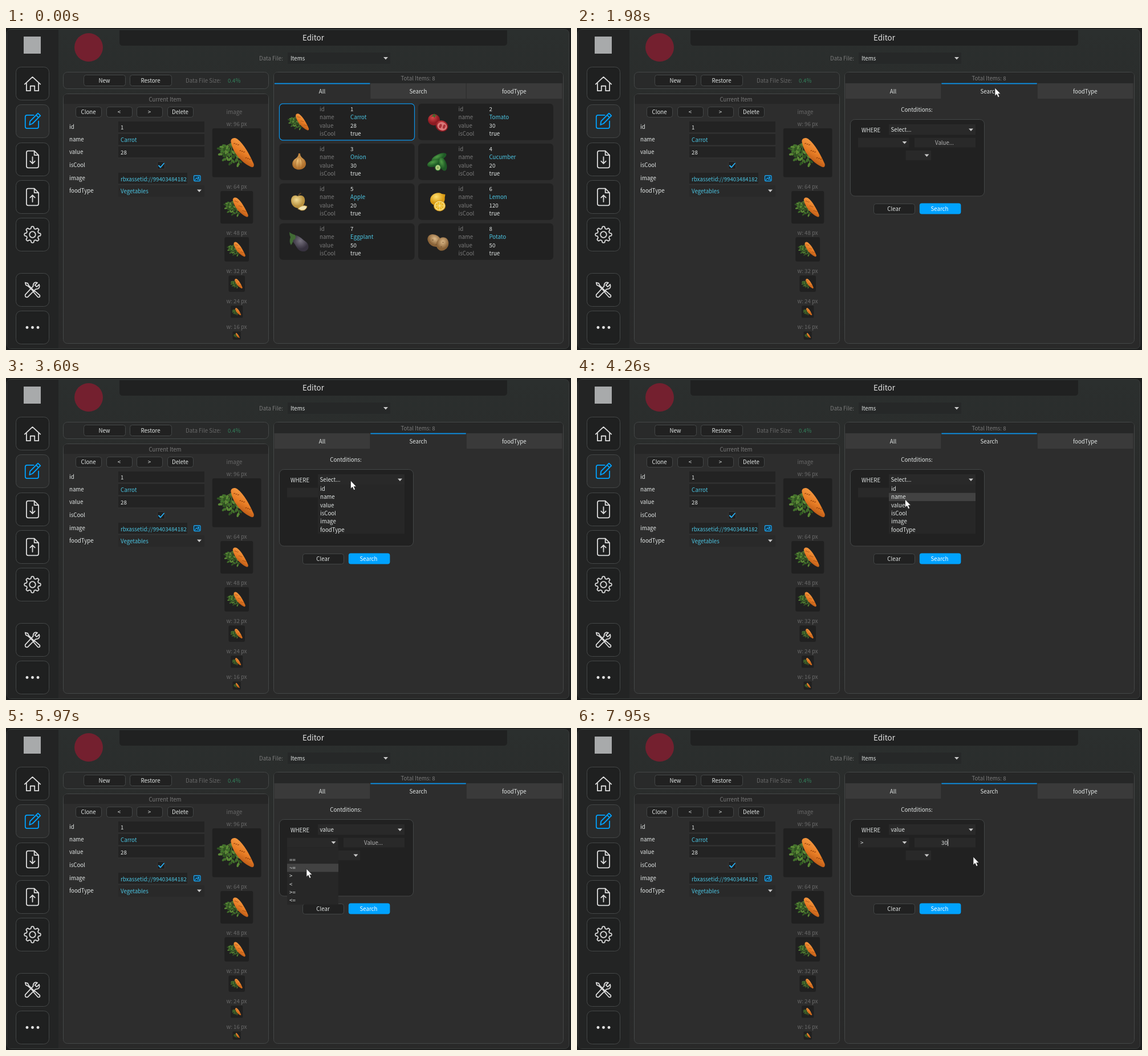
These frames come from a looping animation (991x565 px, 7990 ms). An HTML page:

```html
<!DOCTYPE html>
<html lang="en">
<head>
<meta charset="utf-8">
<title>Item editor</title>
<style>
html, body { margin: 0; width: 100%; height: 100%; overflow: hidden; background: #1e2020; }
svg { display: block; width: 991px; height: 565px; }
text { font-family: "Noto Sans CJK JP", "Noto Sans CJK SC", "Noto Sans", sans-serif; white-space: pre; }
</style>
</head>
<body>
<svg id="stage" viewBox="0 0 991 565">
  <defs>
    <linearGradient id="bg" x2="0" y2="1"><stop stop-color="#2b2f2e"/><stop offset=".25" stop-color="#2a2c2b"/><stop offset="1" stop-color="#292929"/></linearGradient>
    <linearGradient id="orange" x1="0.7" y1="0.1" x2="0.3" y2="0.9"><stop stop-color="#f7a04a"/><stop offset=".5" stop-color="#e87d25"/><stop offset="1" stop-color="#a84c12"/></linearGradient>
    <radialGradient id="red" cx=".4" cy=".3"><stop stop-color="#d8484a"/><stop offset="1" stop-color="#8c1a22"/></radialGradient>
    <radialGradient id="gold" cx=".45" cy=".45"><stop stop-color="#f0c378"/><stop offset="1" stop-color="#b0702c"/></radialGradient>
    <radialGradient id="green" cx=".4" cy=".3"><stop stop-color="#4f9c45"/><stop offset="1" stop-color="#1f5a26"/></radialGradient>
    <radialGradient id="cream" cx=".4" cy=".35"><stop stop-color="#f2dc95"/><stop offset="1" stop-color="#b8913f"/></radialGradient>
    <radialGradient id="yellow" cx=".4" cy=".3"><stop stop-color="#ffe070"/><stop offset="1" stop-color="#d99a14"/></radialGradient>
    <radialGradient id="plum" cx=".5" cy=".35"><stop stop-color="#77727f"/><stop offset="1" stop-color="#37323f"/></radialGradient>
    <radialGradient id="tan" cx=".45" cy=".35"><stop stop-color="#dcb988"/><stop offset="1" stop-color="#8a6338"/></radialGradient>
  </defs>
  <g id="base"></g><g id="scene"></g>
  <path id="cursor" d="M0 0V14.2L3.2 11.3L5.5 16.6L8 15.5L5.7 10.4H10Z" fill="#fff" stroke="#222" stroke-width=".7"/>
</svg>
<script>
const LOOP = 7990;
const WHITE = '#e4e8e7', CYAN = '#4cc6e4', GREY = '#7b7b7b', DIM = '#696969', BLUE = '#00a2ff';
const EDGE = '#444747', PANEL = '#2d2d2d', DARK = '#212121', FIELD = '#292929';
const $ = id => document.getElementById(id);

const rect = (x, y, w, h, fill, r = 0, stroke = 'none', sw = 1) =>
  `<rect x="${x}" y="${y}" width="${w}" height="${h}" rx="${r}" fill="${fill}" stroke="${stroke}" stroke-width="${sw}"/>`;
const path = (d, fill, stroke = 'none', sw = 1) =>
  `<path d="${d}" fill="${fill}" stroke="${stroke}" stroke-width="${sw}" stroke-linecap="round" stroke-linejoin="round"/>`;
const oval = (x, y, rx, ry, fill, turn = 0) =>
  `<ellipse rx="${rx}" ry="${ry}" fill="${fill}" transform="translate(${x} ${y}) rotate(${turn})"/>`;
const place = (x, y, s, body) => `<g transform="translate(${x} ${y}) scale(${s})">${body}</g>`;
// y is the middle of the capitals; baselines sit on whole pixels
const text = (x, y, s, fill = WHITE, anchor = 'start', size = 9.7) =>
  `<text x="${x}" y="${Math.round(y + size * .37)}" fill="${fill}" text-anchor="${anchor}" font-size="${size}">${s.replace(/</g, '&lt;')}</text>`;
const mid = (x, y, s, fill, size) => text(x, y, s, fill, 'middle', size);
const arrow = (x, y) => path(`M${x - 4} ${y - 2}h8l-4 4.4z`, '#c9c9c9');
const button = (x, y, w, h, s) => rect(x + .5, y + .5, w, h, DARK, 4, EDGE) + mid(x + w / 2, y + h / 2 + .5, s);

// Food is drawn around its own centre
function carrot() {
  let s = '';
  for (let i = 4; i >= 0; i--) {
    const turn = 150 - 20 * i, a = turn * Math.PI / 180, length = 24 + 4 * i;
    const at = (r, side) => [-9 + r * Math.cos(a) - side * Math.sin(a), -17 + r * Math.sin(a) + side * Math.cos(a)];
    s += path(`M-9 -17L${at(length, 0)}`, 'none', '#567a30', 1.5);
    for (let k = 0; k < 6; k++) {
      const side = k % 2 ? 1 : -1, [x, y] = at(length * (.45 + k * .11), side * 2.8);
      s += oval(x, y, 3.8, 2, ['#5a8a36', '#41702c', '#2f5522'][(i + k) % 3], turn + side * 35);
    }
  }
  s += path('M-10 -18C-12 -25 -4 -28 1 -24C13 -15 23 4 30 20Q31 27 25 25C10 18 -6 2 -10 -18Z', 'url(#orange)');
  for (let i = 0; i < 9; i++)
    s += path(`M${-5 + i * 3.4} ${-16 + i * 4.2 - i % 3 * 3}l2 -.6`, 'none', '#94420f', 1.2);
  return s;
}
const CARROT = carrot();
const wedge = (x, y, r, n, color) => [...Array(n)].map((_, i) =>
  path(`M${x} ${y}l${r * Math.cos(i * 2 * Math.PI / n)} ${r * Math.sin(i * 2 * Math.PI / n)}`, 'none', color, .8)).join('');

const food = {
  Carrot: place(0, 0, .57, CARROT),
  Tomato: oval(-7, -4, 10.5, 10, 'url(#red)') + path('M-9 -12l3 -3l1 3l4 0l-4 2l-1 3l-2 -3l-4 1z', '#3f6a2c') +
    oval(7, 7, 11, 9.5, 'url(#red)', 20) + oval(7.5, 7.5, 8.6, 7.2, '#d9797a', 20) +
    oval(4.5, 7, 2.3, 3.8, '#a93339', 20) + oval(11, 8, 2.3, 3.8, '#a93339', 20),
  Onion: path('M-1 -15L2 -15Q2 -9 7 -6C15 -1 14 13 0 13.5C-14 13 -15 -1 -6 -6Q-1 -9 -1 -15Z', 'url(#gold)') +
    path('M-1 -9C-8 0 -8 7 -3 13M1 -9C8 0 8 7 3 13M0 -9V13', 'none', '#a76a2c', .8),
  Cucumber: oval(2, -8, 14, 5.6, 'url(#green)', -25) + oval(-6, 2, 13, 6, 'url(#green)', -18) +
    oval(9, 4, 6, 12, 'url(#green)', -18) + oval(0, 10, 5.5, 5.8, '#2f7433') + oval(0, 10, 4.2, 4.5, '#b9d486') + oval(0, 10, 1.8, 2.2, '#8db25c'),
  Apple: path('M-1 -11Q0 -14 3 -15', 'none', '#705029', 1.4) +
    path('M-2 -10C-12 -15 -17 -4 -12 5C-8 12 2 13 7 7C14 -3 9 -15 -2 -10Z', 'url(#cream)') +
    path('M-2 12Q6 4 14 8Q12 16 4 15Z', '#f1e3b2', '#bd943f', 1),
  Lemon: path('M-13 0C-16 -12 -2 -19 7 -14L13 -13L12 -7C14 6 -7 12 -13 0Z', 'url(#yellow)') +
    oval(3, 7, 10.5, 9.5, '#d69a17') + oval(3, 7, 9.2, 8.2, '#f8e8a0') + oval(3, 7, 7.8, 7, '#efb927') + wedge(3, 7, 7.5, 8, '#f8e8a0'),
  Eggplant: path('M-11 -11C-3 -14 5 -5 13 1C20 8 16 18 6 17C-4 16 -5 5 -12 -1Z', 'url(#plum)') +
    path('M-7 -12Q-14 -14 -17 -17Q-17 -12 -15 -8Q-18 0 -14 6Q-11 2 -10 -3Q-4 -5 -7 -12Z', '#416a34'),
  Potato: oval(-6, -2, 13, 10, 'url(#tan)', 35) + oval(8, 4, 10.5, 12, 'url(#tan)', 25) +
    oval(-9, -3, 1.3, .8, '#755330') + oval(-3, 5, 1.2, .8, '#755330') + oval(9, 1, 1.2, .8, '#755330') + oval(6, 9, 1.3, .8, '#755330')
};

const icons = [
  [68, 'M-13 1L0 -11L13 1M-10 -1V12H-3.5V4H3.5V12H10V-1'],
  [134, 'M2 -10H-9Q-12 -10 -12 -7V9Q-12 12 -9 12H7Q10 12 10 9V0M-5 6L-4 0L9 -13L13 -9L0 4ZM6 -10L10 -6'],
  [201, 'M3 -14H-7Q-10 -14 -10 -11V11Q-10 14 -7 14H7Q10 14 10 11V-7ZM3 -14V-7H10M0 -4V7M-4 3L0 7L4 3'],
  [267, 'M3 -14H-7Q-10 -14 -10 -11V11Q-10 14 -7 14H7Q10 14 10 11V-7ZM3 -14V-7H10M0 8V-3M-4 1L0 -3L4 1'],
  [333, gear() + 'M5 0A5 5 0 1 1 -5 0A5 5 0 1 1 5 0'],
  [430, 'M-12 -12L-8 -11L-6 -7L3 2M-12 -12L-11 -8L-7 -6L2 3M2 3L4 2L12 9Q13 13 9 12L2 4ZM11 -9L7 -5L4 -8L8 -12Q1 -14 1 -6L-12 8Q-13 13 -8 12L5 -1Q13 -1 11 -9'],
  [496, '']
];
function gear() {
  let d = '';
  for (let i = 0; i < 96; i++) {
    const a = i * Math.PI / 48, r = 11.8 + 1.7 * Math.tanh(2.5 * Math.cos(8 * a));
    d += `${i ? 'L' : 'M'}${(r * Math.cos(a)).toFixed(1)} ${(r * Math.sin(a)).toFixed(1)}`;
  }
  return d + 'Z';
}

function sidebar() {
  return icons.map(([y, d], i) => {
    const glyph = d ? path(d, 'none', i === 1 ? BLUE : '#dcdcdc', 1.7)
      : [-9, 0, 9].map(x => oval(x, 0, 2.3, 2.3, '#e4e4e4')).join('');
    return rect(17.5, y + .5, 58, 58, i === 1 ? '#2a2b2b' : '#1f2020', 9, EDGE) + place(46.5, y + 29.5, 1.06, glyph);
  }).join('');
}

function itemForm() {
  const rows = [['id', '1', 174], ['name', 'Carrot', 196], ['value', '28', 218], ['isCool', '', 241],
    ['image', 'rbxassetid://99403484182', 264], ['foodType', 'Vegetables', 286]];
  let s = rect(100.5, 115.5, 360, 438, PANEL, 7, EDGE) + path('M101 133V122Q101 116 107 116H454Q460 116 460 122V133Z', '#262626') +
    mid(279, 125, 'Current Item', GREY) + mid(400.5, 147, 'image', DIM);
  [['Clone', 122, 45], ['<', 176, 45], ['>', 229, 45], ['Delete', 283, 45]].forEach(([n, x, w]) => s += button(x, 138, w, 18, n));
  rows.forEach(([name, value, y]) => {
    const w = name === 'image' ? 121 : 151, picker = name === 'foodType';
    s += text(111, y - .5, name);
    if (value) s += rect(197, y - 10, w, 20, picker ? FIELD : '#232323') +
      (picker ? '' : path(`M197 ${y + 10}h${w}`, 'none', '#383838')) +
      text(201, y + (name === 'image' ? 1 : 0), value, /id|value/.test(name) ? WHITE : CYAN);
  });
  s += rect(265.5, 234.5, 13, 13, '#202020', 2, '#3a3a3a') + path('M268 241.5l3 3l6 -7', 'none', '#28b0f5', 1.9) + arrow(339, 285.5) +
    rect(329.5, 259, 11.5, 9.5, '#143448', 1.5, '#1ba3ee', 1.3) + path('M331 267l3 -4l2.5 2.5l1.5 -1.5l2 3', 'none', '#1ba3ee', 1.2) + rect(336, 261, 3, 2, '#1ba3ee');
  [[96, 176], [64, 286], [48, 367], [32, 434.3], [24, 487], [16, 532.5]].forEach(([px, y]) => {
    const size = px * .893;
    s += mid(404.5, y - 8, `w: ${px} px`, DIM) + rect(404.7 - size / 2, y, size, size, '#202020', size > 25 ? 3 : 2) +
      place(404.7, y + size / 2, px / 96, CARROT);
  });
  return s;
}

$('base').innerHTML = rect(0, 0, 991, 565, '#1d1e1e') + rect(1.5, 2.5, 986, 560, 'url(#bg)', 7, '#3b3e3d') +
  path('M8 3H92V562H8Q2 562 2 556V9Q2 3 8 3Z', '#232424') + rect(31, 15, 30, 30, '#a8aaab') + oval(145, 34, 25, 25, '#74202f') +
  path('M199 4H879V25Q879 31 873 31H205Q199 31 199 25Z', '#202121') + mid(539, 17.5, 'Editor', '#e2e2e2', 13.4) +
  text(444, 53, 'Data File:', GREY) + rect(494, 43, 180, 20, '#262828') + text(499, 53, 'Items') + arrow(666, 53) +
  sidebar() +
  rect(100.5, 77.5, 360, 29, '#292a2a', 7, EDGE) + button(136, 82, 73, 19, 'New') + button(217, 82, 73, 19, 'Restore') +
  text(315, 92, 'Data File Size:', DIM) + text(389, 92, '0.4%', '#33805c') +
  itemForm() +
  rect(469.5, 77.5, 508, 476, PANEL, 7, EDGE) + path('M470 97V84Q470 78 476 78H971Q977 78 977 84V97Z', '#262727') +
  mid(722.5, 88, 'Total Items: 8', GREY);

const items = [['Carrot', 28], ['Tomato', 30], ['Onion', 30], ['Cucumber', 20], ['Apple', 20], ['Lemon', 120], ['Eggplant', 50], ['Potato', 50]];
function cards(tip) {
  return items.map(([name, value], i) => {
    const x = i % 2 * 243.5, y = 70 * (i >> 1);
    const hot = tip && Math.abs(tip.x - x - 598) < 119 && Math.abs(tip.y - y - 165) < 32;
    const values = { id: i + 1, name, value, isCool: true };
    return rect(479.5 + x, 132.8 + y, 237, 64, hot ? '#181818' : DARK, 6, i ? 'none' : '#0c95ec', 1.2) + place(514 + x, 165 + y, 1, food[name]) +
      Object.keys(values).map((key, r) => text(550 + x, 142.6 + y + r * 14.3, key, GREY) +
        text(604 + x, 142.6 + y + r * 14.3, String(values[key]), key === 'name' ? CYAN : WHITE)).join('');
  }).join('');
}

function tabs(active) {
  return ['All', 'Search', 'foodType'].map((name, i) => {
    const x = 471 + i * 168.4;
    return rect(x, 97, 167.4, 27, i === active ? PANEL : '#3a3a3a') +
      (i === active ? rect(x, 96.6, 167.4, 1.8, '#0c95ec') : '') + mid(x + 83.5, 111, name);
  }).join('');
}

const ROW = 14.3;
function list(x, y, w, names, tip) {
  const hot = tip.x > x && tip.x < x + w ? Math.floor((tip.y - y) / ROW) : -1;
  return rect(x, y, w, names.length * ROW, '#272727') + names.map((n, i) =>
    (i === hot ? rect(x, y + i * ROW, w, ROW, '#424242') : '') + text(x + 4, y + (i + .5) * ROW, n)).join('');
}

function searchForm(t, tip) {
  const typed = t < 7660 ? '' : t < 7800 ? '3' : '30';
  const caret = typed || (t >= 6960 && t < 7220) || t >= 7490;
  let s = mid(596, 143.5, 'Contditions:') + rect(479.5, 160.5, 235, 134.5, DARK, 8, EDGE) + text(499, 179.5, 'WHERE') +
    rect(547, 169, 152, 18.5, FIELD) + text(550.5, 178.5, t < 5010 ? 'Select...' : 'value') + arrow(691, 178.5) +
    rect(493, 192.5, 89.5, 17, FIELD) + text(497, 201, t < 6370 ? '' : '>') + arrow(574.5, 201) +
    rect(592, 192.5, 107, 17, FIELD) + mid(644.5, 201.5, typed || 'Value...', typed ? WHITE : '#b4b4b4') +
    rect(576.5, 215, 44.5, 17, FIELD) + arrow(613.5, 223.5) + button(520, 308, 72, 18, 'Clear') +
    rect(600.8, 307.6, 72.6, 18.8, BLUE, 4) + mid(636, 317.5, 'Search', '#fff');
  if (caret) s += rect(typed ? 644.5 + typed.length * 2.8 : 628, 195, 1, 12, '#e8e8e8');
  if (t >= 3230 && t < 5010) s += list(547, 187.3, 152, ['id', 'name', 'value', 'isCool', 'image', 'foodType'], tip);
  if (t >= 5640 && t < 6370) s += list(493, 209.6, 90, ['', '==', '~=', '>', '<', '>=', '<='], tip);
  return s;
}

const moves = [[490, 620, 537], [860, 693.5, 161], [1280, 733.5, 107], [1320, 733, 105], [2110, 733, 105], [2640, 614, 176],
  [2810, 608, 178], [3560, 608, 178], [3600, 604.5, 180], [4100, 575.5, 212], [4430, 575.5, 214], [4790, 575.5, 214],
  [4840, 575, 219], [5010, 574, 220], [5130, 573, 221], [5300, 573, 221], [5600, 552, 197], [5970, 527, 247], [6050, 521, 260],
  [6130, 520.5, 261], [6370, 520.5, 261], [6880, 650, 199], [7160, 682, 222], [7290, 686, 224], [7660, 686, 224], [7950, 695, 226]];
function cursorAt(t) {
  const i = moves.findIndex(m => m[0] > t);
  const b = moves[i < 0 ? moves.length - 1 : i], a = moves[Math.max(0, (i < 0 ? moves.length : i) - 1)];
  const p = a === b ? 1 : (t - a[0]) / (b[0] - a[0]), e = p * p * (3 - 2 * p);
  return { x: a[1] + (b[1] - a[1]) * e, y: a[2] + (b[2] - a[2]) * e };
}

let shown = '';
function render(t) {
  const visible = t >= moves[0][0], search = t >= 1860;
  const tip = visible ? cursorAt(t) : null;
  const scene = tabs(search ? 1 : 0) + (search ? searchForm(t, tip) : cards(tip));
  if (scene !== shown) $('scene').innerHTML = shown = scene;
  $('cursor').style.display = visible ? '' : 'none';
  if (visible) $('cursor').setAttribute('transform', `translate(${tip.x} ${tip.y})`);
}

const start = performance.now();
function tick() {
  render((performance.now() - start) % LOOP);
  requestAnimationFrame(tick);
}
tick();
</script>
</body>
</html>
```
